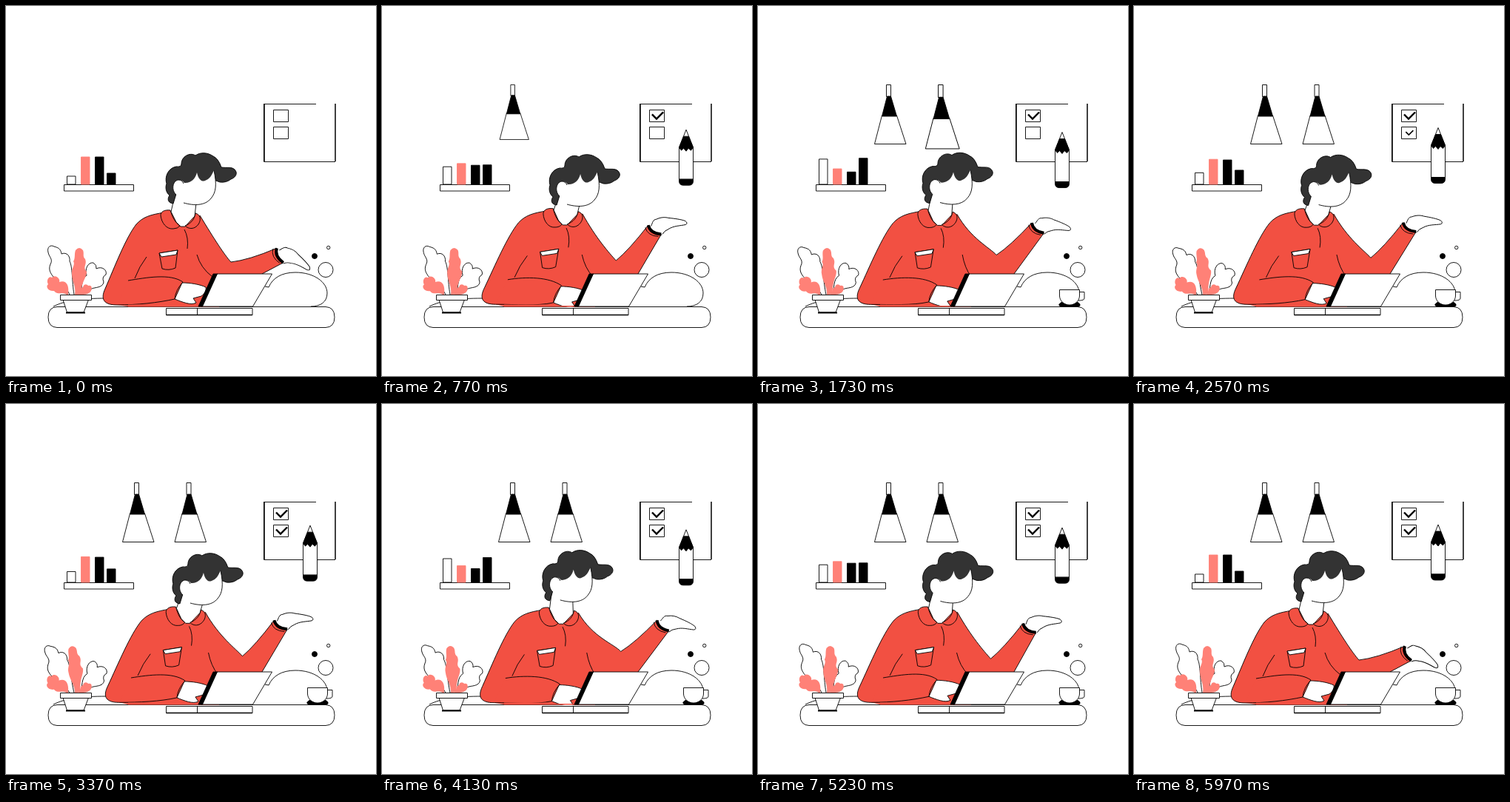
Animation of 500x500 px, one loop 6 s. Source, as an HTML page with a canvas:

```html
<!DOCTYPE html>
<html>
<head>
<meta charset="utf-8">
<style>
html, body { margin: 0; width: 100%; height: 100%; overflow: hidden; background: #fff }
canvas { display: block }
</style>
</head>
<body>
<canvas id="stage" width="500" height="500"></canvas>
<script>
const c = document.getElementById('stage').getContext('2d');
const BLACK = '#000', WHITE = '#fff', RED = '#f25042', CORAL = '#ff8177', HAIR = '#333';

function draw(d, fill, stroke = BLACK, width = .9) {
  const p = new Path2D(d);
  if (fill) { c.fillStyle = fill; c.fill(p); }
  if (stroke) { c.strokeStyle = stroke; c.lineWidth = width; c.stroke(p); }
}
const line = (d, width) => draw(d, null, BLACK, width);
const box = (x, y, w, h, fill = WHITE, stroke) => draw(`M${x} ${y}h${w}v${h}h${-w}z`, fill, stroke);
const dot = (x, y, r, fill) => draw(`M${x - r} ${y}a${r} ${r} 0 1 0 ${2 * r} 0a${r} ${r} 0 1 0 ${-2 * r} 0`, fill);

// Run paint() rotated and scaled around (x, y)
function around(x, y, angle, scale, paint) {
  if (scale <= 0) return;
  c.save();
  c.translate(x, y);
  c.rotate(angle * Math.PI / 180);
  c.scale(scale, scale);
  c.translate(-x, -y);
  paint();
  c.restore();
}

const ease = u => (1 - Math.cos(Math.PI * u)) / 2;
const mix = (a, b, u) => a + (b - a) * u;

// One key per second, eased in between
function keyed(t, keys) {
  const i = Math.floor(t);
  return mix(keys[i], keys[i + 1], ease(t - i));
}

// Grow from nothing, overshoot, settle
function pop(t, start) {
  const p = t - start;
  if (p <= 0) return 0;
  return p < .4 ? 1.08 * ease(p / .4) : mix(1.08, 1, ease(Math.min(1, (p - .4) / .3)));
}

function lamp(x, scale) {
  around(x, 106, 0, scale, () => {
    box(x - 5, 106.5, 6, 16);
    draw(`M${x - 11} 148L${x - 21} 186.5H${x + 21.5}L${x + 9} 148z`, WHITE);
    draw(`M${x - 4} 122H${x + 1}L${x + 9} 149H${x - 11}z`, BLACK);
  });
}

function board(t, bob) {
  line('M419 132.5H348.5V210.5H445');
  line('M349 132V210M445 132V210', 1.5);
  [[140.5, .15], [163.5, 2.34]].forEach(([y, start]) => {
    box(361.5, y, 20, 16);
    around(372, y + 8, 0, pop(t, start), () => line(`M365 ${y + 6}L371 ${y + 12}L380 ${y + 3}`, 2.4));
  });
  around(411, 200 + bob, 0, pop(t, .05), () => {
    c.translate(0, bob);
    draw('M411 163L401.5 187V230H420.5V187z', WHITE);
    draw('M407.5 172H414.5L420.5 187L417.5 191L414 188L411 192L407.5 188L404.5 191L401.5 187z', BLACK);
    draw('M401.5 230H420.5V233Q420 238 415 238H407Q402 238 401.5 233z', BLACK);
  });
}

function shelf(u) {
  box(78.5, 241.5, 94, 8.5);
  [[82, 11, 35.5, WHITE], [101, 37, 20, CORAL], [120, 37, 15.5, BLACK], [136, 15, 36.5, BLACK]]
    .forEach(([x, low, high, fill]) => {
      const h = mix(low, high, u);
      box(x + .5, 241 - h, 11.5, h, fill, fill === CORAL ? CORAL : BLACK);
    });
}

function plant(s) {
  around(94, 390, -4.5 * s, 1, () => draw(
    'M86 390C82 379 68 374 64 366C60 361 57 356 60 349C64 342 58 339 57 333C55 326 60 322 65 325C73 327 74 330 75 335C82 332 87 338 86 345C90 352 89 372 92 390', WHITE));
  around(98, 390, 2 * s, 1, () => draw(
    'M100 390C104 382 100 370 109 364C106 355 111 346 118 347Q123 350 122 355C130 351 137 357 135 363Q129 366 132 373C131 381 120 380 116 382Q108 384 104 390', WHITE));
  around(96, 390, -9.5 * s, 1, () => draw(
    'M93 390C95 379 89 372 89 362C88 354 94 350 91 345C94 341 92 335 94 330Q99 324 104 330C106 335 103 338 107 342C110 350 103 352 109 359C109 368 102 371 101 390z', CORAL, null));
  around(90, 390, -2 * s, 1, () => draw(
    'M82 390C76 386 69 391 65 385C57 386 53 379 57 376C54 371 58 364 62 367C67 362 74 369 72 373C80 370 86 375 84 390z', CORAL, null));
  draw('M98 390C102 384 100 381 104 380C105 375 110 376 111 378C117 376 116 383 115 385Q112 390 104 390z', CORAL, null);
  draw('M77 397H111.5L105 414H82.5z', WHITE);
  line('M81 414.5H107', 2);
  box(73.5, 390.5, 42, 7);
}

function person(t) {
  const lean = keyed(t, [0, 10.3, 6.3, 9.1, 3.2, 8.5, 0]);
  const typing = keyed(t, [0, 7, 4.5, -1.5, 7.3, -1, 0]);
  const headX = keyed(t, [0, 11.5, 4.9, 12.6, .5, 7.4, 0]);
  const headY = keyed(t, [0, 2.3, -1, 4.8, -1.2, .5, 0]);
  const ex = keyed(t, [304, 318, 323, 318, 323, 316, 304]);
  const ey = keyed(t, [346, 343.7, 335, 343.7, 334, 344, 346]);
  const arm = keyed(t, [-7.5, -42.7, -31, -42.7, -31, -42.7, -7.5]);
  const hand = keyed(t, [25, -17.5, 6, -17.5, 6, -17.5, 25]);

  // Lean a path: the higher the point, the further it moves
  const bend = d => d.replace(/([\d.]+) ([\d.]+)/g, (_, x, y) => {
    const shift = lean * (.4 + .6 * (400 - y) / 120);
    return `${+x + shift} ${y - shift / 4}`;
  });
  const polar = (x, y, r, deg) => [x + r * Math.cos(deg * Math.PI / 180), y + r * Math.sin(deg * Math.PI / 180)];
  const wrist = polar(ex, ey, 67, arm);
  const top = polar(...wrist, -11, arm + 73), low = polar(...wrist, 10.5, arm + 73);
  const mid = polar(ex, ey + 4, 25, arm - 8);
  const band = `${polar(...wrist, -8, arm)} `;

  // Raised hand
  c.save();
  c.translate(...wrist);
  c.rotate(hand * Math.PI / 180);
  draw('M-4 -6C-1 -10 0 -14 5 -13.5C11 -15 17 -14 21 -11.9C30 -9 38 -6 42.6 -3Q46 1 42 2C34 2 26 0 18 3Q12 4 8.7 8', WHITE);
  c.restore();

  // Sweater and raised sleeve
  const back = bend('M214 279C195 282 185 285 176 295C162 313 147 352 134 382C127 397 133 404 150 404');
  draw(back + `L165 406H288L346 362L${low}Q${band}${top}Q${mid} ${ex} ${ey}`
    + `C${ex - 9} ${ey - 10} ` + bend('282 316 262 283z'), RED, null);
  line(back);
  line(bend('M262 283C282 316 ') + `${ex - 9} ${ey - 10} ${ex} ${ey}Q${mid} ${top}`);
  line(`M${low}L346 362`);
  line(`M${top}Q${band}${low}`, 4);
  line(`M${polar(...top, -5, arm)}Q${polar(...wrist, -13, arm)} ${polar(...low, -5, arm)}`);

  // Neck, collar, seams
  const hx = x => x + headX, hy = y => y + headY;
  draw(`M${hx(229)} ${hy(252)}L` + bend('223 278L230 292L236 298L242 298L255 284')
    + `L${hx(257)} ${hy(266)}z`, WHITE);
  draw(bend('M222 276C214 275 209 278 209 283C210 293 217 302 226 301Q232 301 235 297C229 293 225 286 222 276z'), RED);
  draw(bend('M256 280C263 282 264 289 260 295C255 302 247 302 242 297C250 294 255 288 256 280z'), RED);
  line(bend('M241 302Q247 313 245 328'));
  draw(bend('M207 334L232 330L229 354Q220 358 211 355z'), RED);
  draw(bend('M207 334L232 330L230 336L210 339z'), WHITE);
  line(bend('M190 339Q180 352 174 368'));
  const fold = ex - 304;
  line(`M${258 + fold} 336Q${263 + fold * .9} 354 ${279 + fold * .5} 366`);

  // Typing arm: the cuff moves, the elbow rests on the desk
  const dx = lean * .4, dy = typing * .8;
  const at = (x, y) => `${x + dx} ${y + dy} `;
  c.save();
  c.beginPath();
  c.rect(0, 0, 500, 407);
  c.clip();
  around(0, 0, 0, 1, () => {
    c.translate(dx, dy);
    draw('M238 374C248 374 262 376 270 380C271 385 268 389 264 392L253 395L257 401C250 405 238 400 228 396z', WHITE);
  });
  const sleeve = bend('M165 371C190 367 ') + at(222, 361) + at(239, 373) + 'Q' + at(229, 384) + at(228, 396)
    + 'C' + at(205, 401) + bend('178 404 150 404');
  draw(sleeve, RED, null);
  line(sleeve);
  c.restore();
  draw('M165 403.5H230V406.5H165z', RED, null);
  draw('M230 405H288V406.5H230z', RED, null);

  // Head
  c.save();
  c.translate(headX, headY);
  draw('M226 267C218 266 218 260 221 256C216 252 215 245 217 240C214 231 219 219 230 217Q237 218 237 213C237 204 248 197 256 202C263 197 273 198 280 203Q287 206 291 218C299 219 305 217 309 221C314 226 310 232 304 234Q298 239 289 238L281 235L230 254z', HAIR);
  draw('M281 222C285 241 284 252 277 260C269 270 254 270 240 266L230 255C223 249 225 236 233 235Q238 235 241 239C249 240 256 234 258 225C260 235 265 238 269 236C275 234 278 229 281 222z', WHITE, null);
  line('M281 222C285 241 284 252 277 260C269 270 254 270 240 266');
  line('M230 255C223 249 225 236 233 235Q238 235 240 240');
  c.restore();
}

function laptop() {
  draw('M285 362H359.5L333.5 406H264z', WHITE);
  draw('M280 362H285.5L265.5 406H260z', BLACK);
  box(216.5, 408.5, 116.5, 9);
  line('M216.5 417.5H333', 1.6);
  line('M258.5 408V418');
}

function cup(scale) {
  around(421, 406, 0, scale, () => {
    draw('M434 386.5H441V395Q441 398 433 398', WHITE);
    draw('M410 400.5H432Q437 403 434 406H409Q404 404 410 400.5z', BLACK);
    draw('M407.5 383.5H434.5V392C434 399 428 404 421 404C414 404 408 399 407.5 392z', WHITE);
  });
}

function frame() {
  const t = performance.now() % 6000 / 1000;
  const beat = ease(t / 1.5);
  c.fillStyle = WHITE;
  c.fillRect(0, 0, 500, 500);
  lamp(178.5, pop(t, .47));
  lamp(249, pop(t, 1.33));
  board(t, 8 * beat);
  shelf(beat);
  line('M350 379L355 380C360 368 372 360 391 360C416 360 434 373 434 388C434 400 425 406 412 406');
  line('M64 406C80 398 100 395 136 395');
  draw('M69 406.5H432Q444 407 444 420.5T432 434.5H69Q57 434 57 420.5T69 406.5z', WHITE);
  dot(417, 338, 3.5, BLACK);
  dot(432, 356.5, 10, WHITE);
  dot(435.7, 326.5, 2.2, WHITE);
  person(t);
  laptop();
  plant(ease(t / 3));
  cup(pop(t, .95));
  requestAnimationFrame(frame);
}
frame();
</script>
</body>
</html>
```
